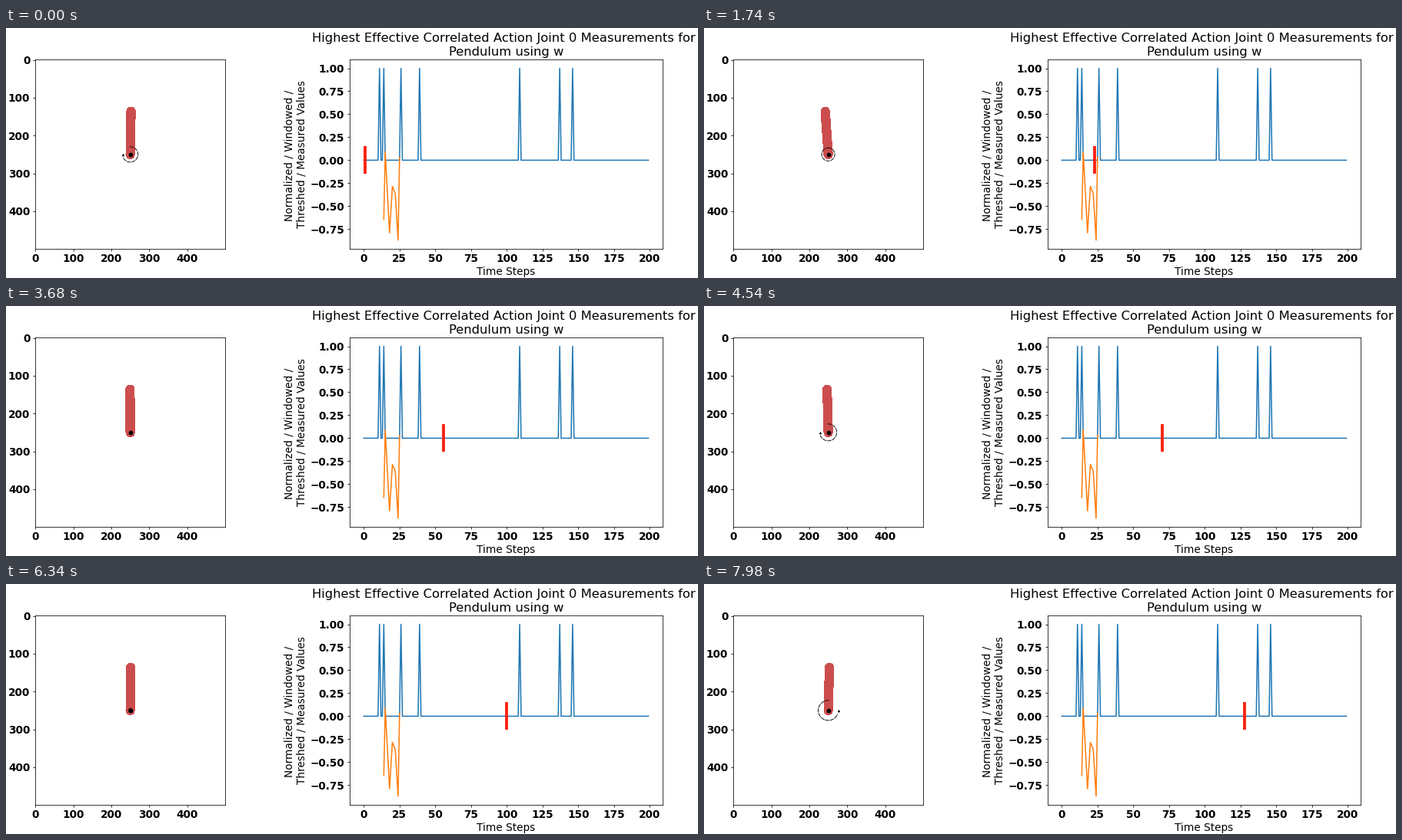
A matplotlib script that plays this animation: 900 px wide and 326 px high, repeating every 8 s.

```python
import numpy as np
import matplotlib.pyplot as plt
from matplotlib.animation import FuncAnimation

W, H = 900, 326
FRAMES, INTERVAL = 400, 20
PT = 0.97                # stage pixels per typographic point
PIVOT = 250
ROD = 500 / 4.4          # rod length in image units
IMG_PX = 500 / 246.5     # image units per stage pixel

plt.rcParams.update({
    "font.family": "DejaVu Sans",
    "font.size": 14 * PT,
    "axes.linewidth": 0.8 * PT,
    "xtick.major.size": 3.5 * PT, "ytick.major.size": 3.5 * PT,
    "xtick.major.pad": 2.8 * PT, "ytick.major.pad": 3.5 * PT,
    "lines.linewidth": 1.6 * PT,
})

# key poses: time in ms, rod lean in degrees, signed ring radius in px
KEY_MS = np.array([0, 1740, 2820, 4540, 5640, 6340, 7980])
LEAN = [1, -4, 1, -1.5, -2, 0.5, 1.5]
TORQUE = [10, 8.5, 4.5, 11, 0, 2.5, -13]

fig = plt.figure(figsize=(W / 72, H / 72), dpi=72, facecolor="white")


def add_axes(x0, x1, y0=41.3, y1=287.9):
    return fig.add_axes([x0 / W, 1 - y1 / H, (x1 - x0) / W, (y1 - y0) / H])


def bold_ticks(ax):
    for label in ax.get_xticklabels() + ax.get_yticklabels():
        label.set_fontweight("bold")


# pendulum view
view = add_axes(38.1, 284.6)
view.set(xlim=(-0.5, 499.5), ylim=(499.5, -0.5),
         xticks=range(0, 500, 100), yticks=range(0, 500, 100))
bold_ticks(view)
rod, = view.plot([], [], color=(0.8, 0.3, 0.3), lw=11.2,
                 solid_capstyle="round", antialiased=False)
view.plot([PIVOT], [PIVOT], "o", color="black", ms=5.8, mew=0)
ring, = view.plot([], [], color="black", lw=0.9, ls=(0, (6, 1)))
head, = view.plot([], [], "^", color="black", ms=3.6, mew=0)

# measurement chart
chart = add_axes(446.8, 854)
chart.set(xlim=(-9.95, 208.95), ylim=(-0.9635, 1.0935),
          xticks=range(0, 201, 25), yticks=np.arange(-0.75, 1.01, 0.25))
bold_ticks(chart)
chart.set_title("Highest Effective Correlated Action Joint 0 Measurements for \n"
                "Pendulum using w", fontsize=16.9 * PT, pad=5.6 * PT)
chart.set_xlabel("Time Steps", labelpad=3 * PT)
chart.set_ylabel("Normalized / Windowed / \nThreshed / Measured Values",
                 labelpad=4 * PT)

pulses = np.zeros(200)
pulses[[11, 14, 26, 39, 109, 137, 146]] = 1
chart.plot(pulses, color="tab:blue")
chart.plot([14, 15, 18, 20, 22, 24, 25],
           [-0.645, 0.09, -0.79, -0.285, -0.36, -0.87, 0.03],
           color="tab:orange")
cursor, = chart.plot([], [], color="#f8200c", lw=3.8,
                     solid_capstyle="butt", zorder=5)


def pose(t):
    """Lean and torque: eased between key poses, torque flickering per step."""
    away = t - KEY_MS[np.argmin(abs(KEY_MS - t))]
    flicker = 8 * np.sin(2.1 * round(away / 60))
    return np.interp(t, KEY_MS, LEAN), np.interp(t, KEY_MS, TORQUE) + flicker


def draw_ring(torque):
    size = abs(torque)
    r = size * IMG_PX
    side = 1 if torque >= 0 else -1
    # a small ring closes up, a large one leaves room for its arrow head
    a = np.radians(np.linspace(95, -265 if size < 9 else -160, 60))
    ring.set_data(PIVOT + side * r * np.cos(a), PIVOT - r * np.sin(a))
    head.set_data([PIVOT - side * r], [PIVOT])
    head.set_visible(size > 9)


def update(i):
    t = i * INTERVAL
    lean, torque = pose(t)
    a = np.radians(lean)
    rod.set_data([PIVOT, PIVOT + ROD * np.sin(a)],
                 [PIVOT, PIVOT - ROD * np.cos(a)])
    draw_ring(torque)
    # the cursor waits on the first step, then advances steadily
    step = max(1, round(0.01675 * t - 5.72))
    cursor.set_data([step, step], [-0.15, 0.15])
    return rod, ring, head, cursor


anim = FuncAnimation(fig, update, frames=FRAMES, interval=INTERVAL,
                     repeat=True, repeat_delay=0)
plt.show()
```
